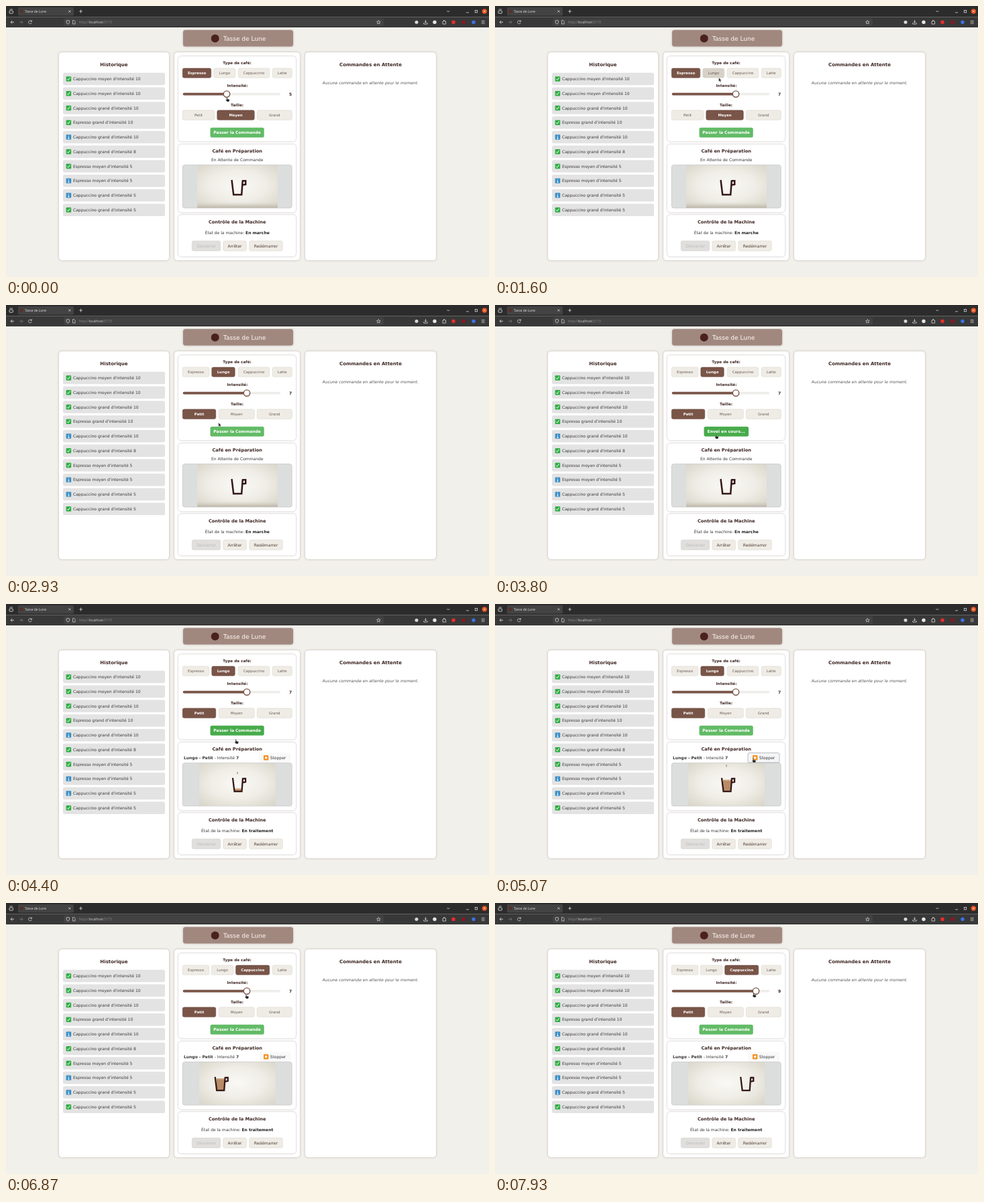
Animation of 720x405 px, one loop 8000 ms. Source, as an HTML page:

```html
<!DOCTYPE html>
<html lang="fr">
<head>
<meta charset="utf-8">
<title>Tasse de Lune</title>
<style>
html, body { margin: 0; width: 100%; height: 100%; overflow: hidden; background: #f2f0eb; }
svg { display: block; width: 720px; height: 405px; font-family: "DejaVu Sans", sans-serif; }
.ui { font-family: "Open Sans", "Noto Sans", sans-serif; }
.card { filter: drop-shadow(0 .8px 1.6px rgba(60, 45, 35, .32)); }
</style>
</head>
<body>
<svg viewBox="0 0 720 405">
  <defs>
    <radialGradient id="paper" cx=".5" cy=".48" r=".72">
      <stop offset="0" stop-color="#faf9f6"/>
      <stop offset=".5" stop-color="#efede6"/>
      <stop offset="1" stop-color="#d8d4c8"/>
    </radialGradient>
    <linearGradient id="floor" x2="0" y2="1">
      <stop offset="0" stop-color="#d5d1c5" stop-opacity="0"/>
      <stop offset="1" stop-color="#b9b3a5"/>
    </linearGradient>
    <clipPath id="view"><rect x="288" y="238" width="114" height="63.6"/></clipPath>
  </defs>
  <g id="fixed"></g>
  <g id="live"></g>
</svg>
<script>
const LOOP = 8000;
const BROWN = '#795548', DARK = '#3e2723', INK = '#383838', CUP = '#351917';

// Shapes: boxes are given by their edges, text by its vertical middle.
const box = (l, t, r, b, fill, radius = 0, extra = '') =>
  `<rect x="${l}" y="${t}" width="${r - l}" height="${b - t}" rx="${radius}" fill="${fill}" ${extra}/>`;
const dot = (x, y, r, fill, extra = '') => `<circle cx="${x}" cy="${y}" r="${r}" fill="${fill}" ${extra}/>`;
const line = (d, color, width = 1, extra = '') =>
  `<path d="${d}" fill="none" stroke="${color}" stroke-width="${width}" ${extra}/>`;
const text = (x, y, size, content, fill = INK, extra = '') =>
  `<text x="${x}" y="${y + size * .365}" font-size="${size}" fill="${fill}" ${extra}>${content}</text>`;
const MID = 'text-anchor="middle"', BOLD = 'font-weight="700"';
const mid = (x, y, size, content, fill, extra = '') => text(x, y, size, content, fill, `${MID} ${extra}`);
const heading = (x, y, size, content) => mid(x, y, size, content, DARK, BOLD);
const card = (l, t, r, b) => box(l, t, r, b, '#fff', 4.5, 'class="card"');

function button(l, t, r, b, label, size, mode = '') {
  const on = mode === 'on', off = mode === 'off';
  const fill = on ? BROWN : off ? '#e0dfdd' : mode === 'hover' ? '#d7d1c8' : '#efece6';
  const edge = on ? '#654438' : off ? '#cfcecb' : '#d6d0c6';
  const color = on ? '#fff' : off ? '#bdbbb8' : size > 5.5 ? '#4e3a33' : '#6b5950';
  return box(l + .25, t + .25, r - .25, b - .25, fill, 2.4, `stroke="${edge}" stroke-width=".5"`) +
    mid((l + r) / 2, (t + b) / 2, size, label, color, on ? BOLD : '');
}

function browser() {
  const c = '#d8d8d8', dim = '#8b8b8b';
  return box(0, 0, 720, 16.5, '#2c2c2c') + box(0, 16.5, 720, 32, '#383838') +
    box(18, 2, 101, 14.5, '#434343', 2) + box(86, 18.2, 563, 30, '#424242', 2) +
    box(5, 7, 10.4, 11, 'none', 1, `stroke="${c}" stroke-width=".9"`) + line('M5.5 5H10', c, .8) +
    dot(23, 8, 2.6, '#5a3029') + text(28, 8, 4.9, 'Tasse de Lune', '#e0e0e0', 'class="ui"') +
    line('M93.3 6.5l3 3m0-3l-3 3M109 8h5m-2.5-2.5v5M657.3 7l2 2 2-2M686 9.8h4', c, .8) +
    box(699.3, 6.5, 702.7, 9.8, 'none', 0, `stroke="${c}" stroke-width=".8"`) +
    dot(713.3, 8, 3.7, '#e95420') + line('M712 6.7l2.6 2.6m0-2.6l-2.6 2.6', '#fff', .7) +
    line('M12 24.2H7m2.2-2.3L7 24.2l2.2 2.3', c, .9) +
    line('M20 24.2h5m-2.2-2.3l2.2 2.3-2.2 2.3', '#777', .9) +
    line('M38 23a2.4 2.4 0 1 0 .2 2M38.4 21.2V23.2h-2', c, .8) +
    line('M92.3 21.3l2.2.8v2q-.2 2-2.2 3-2-1-2.2-3v-2z', c, .8) +
    line('M99.5 21.5h2.2l1.4 1.4v4h-3.6z', c, .7) +
    text(109, 24.2, 5.05, 'http://<tspan fill="#d5d5d5">localhost</tspan>:5173', dim, 'class="ui"') +
    line('M555.4 21.4l.8 1.9 2 .2-1.5 1.3.5 2-1.8-1-1.8 1 .5-2-1.5-1.3 2-.2z', c, .7) +
    dot(612, 24.2, 2.5, c) + line('M625.5 21v4m-1.8-1.6l1.8 1.7 1.8-1.7M622.8 25v2h5.4v-2', c, .8) +
    dot(639, 24.2, 2.7, '#e6e6e6') + line('M651 23h1.5v-1.5h1.6V23h1.5v4H651z', c, .8) +
    box(664.5, 21.8, 669.5, 26.8, '#ef2b2b', .8) + dot(682, 24.2, 2.7, '#8d1720') +
    dot(697, 24.2, 2.7, '#3b72e8') + line('M708.7 22.2h5m-5 2h5m-5 2h5', c, .7);
}

const HISTORY = [
  ['Cappuccino moyen', 10, 1], ['Cappuccino moyen', 10, 1], ['Cappuccino grand', 10, 1],
  ['Espresso grand', 10, 1], ['Cappuccino grand', 10, 0], ['Cappuccino grand', 8, 1],
  ['Espresso moyen', 5, 1], ['Espresso moyen', 5, 0], ['Cappuccino grand', 5, 0],
  ['Cappuccino grand', 5, 1]];

function historyRow([drink, strength, done], i) {
  const y = 109 + i * 21.75;
  const mark = done
    ? line(`M91.2 ${y + .2}l1.5 1.7 2.8-4`, '#fff', 1)
    : line(`M93.4 ${y - 2.4}v1.1m-.8 1h.8v2.7m-1.2 0h2.4`, '#fff', .9);
  return box(85, y - 9.2, 237, y + 9.2, '#e3e3e3', 2.5) +
    box(89.6, y - 3.7, 97.2, y + 3.7, done ? '#2fae43' : '#3a8fc7', 1) + mark +
    text(100, y, 6, `${drink} d'intensité ${strength}`);
}

document.getElementById('fixed').innerHTML =
  box(0, 0, 720, 405, '#f2f0eb') + browser() +
  box(264, 36, 428, 60.5, '#a1887f', 3.5, 'class="card"') +
  dot(311.7, 48.4, 6, '#4a211e') + text(324, 48.3, 9, 'Tasse de Lune', '#fff8f2') +
  card(79, 69.3, 243, 380) + card(251, 69.3, 438, 380) + card(446, 69.3, 641, 380) +
  card(257, 75.3, 432, 202) + card(257, 207, 432, 308) + card(257, 312.3, 432, 374.3) +
  heading(161, 87, 7.02, 'Historique') + HISTORY.map(historyRow).join('') +
  heading(543.5, 87, 7.02, 'Commandes en Attente') +
  heading(344.6, 85.2, 5.7, 'Type de café:') + heading(345, 119.2, 5.7, 'Intensité:') +
  heading(344.6, 148.2, 5.7, 'Taille:') +
  heading(344.7, 217, 6.6, 'Café en Préparation') +
  heading(344.7, 322.8, 6.6, 'Contrôle de la Machine') +
  button(277, 350.8, 320, 366.3, 'Démarrer', 6, 'off') +
  button(323.6, 350.8, 358.6, 366.3, 'Arrêter', 6) +
  button(362.5, 350.8, 412.5, 366.3, 'Redémarrer', 6);

// Pointer stops: time, x, y.
const PATH = [
  [0, 328.4, 136], [120, 328.4, 136], [650, 358, 137], [870, 362, 150], [1050, 362, 150],
  [1600, 333.5, 107], [1780, 326, 101], [2000, 326, 101], [2400, 306.3, 160], [2680, 306.3, 160],
  [3200, 328.4, 193], [4200, 328.4, 193], [4830, 384, 230], [5150, 384, 230],
  [5700, 384, 193], [6350, 369, 101], [6600, 369, 101], [6850, 357, 136], [7150, 357, 136],
  [7650, 384, 135], [8000, 384.6, 134]];

function pointerAt(t) {
  const i = Math.max(1, PATH.findIndex(stop => stop[0] > t));
  const [t0, x0, y0] = PATH[i - 1], [t1, x1, y1] = PATH[i];
  const k = (t - t0) / (t1 - t0), e = k * k * (3 - 2 * k);
  return [x0 + (x1 - x0) * e, y0 + (y1 - y0) * e];
}

// Last value whose start time has passed.
const stepAt = (t, steps) => steps.filter(s => s[0] <= t).pop()[1];
const LEVEL = [[0, 5], [350, 6], [600, 7], [7350, 8], [7620, 9]];
const DRINK = [[0, 0], [1870, 1], [6480, 2]];
const DRINKS = ['Espresso', 'Lungo', 'Cappuccino', 'Latte'];
const DRINK_EDGES = [
  [[263, 306], [309.5, 342], [346, 393], [397, 426.5]],
  [[263, 303], [306.5, 341.5], [346, 393], [397, 426.5]],
  [[263, 303], [306, 339], [342.3, 393], [397, 426.5]]];
const SIZES = ['Petit', 'Moyen', 'Grand'];
const SIZE_EDGES = [
  [[263, 313], [317, 370.5], [374, 426.5]],
  [[263, 311], [314.5, 370.5], [374, 426.5]]];

function choices(labels, edges, chosen, top, bottom, [px, py]) {
  return labels.map((label, i) => {
    const [l, r] = edges[i];
    const over = px > l && px < r && py > top && py < bottom;
    return button(l, top, r, bottom, label, 5.4, i === chosen ? 'on' : over ? 'hover' : '');
  }).join('');
}

// Cup around its own centre; fill runs from 0 (empty) to 1.
function cup(x, y, scale, fill) {
  const top = 10.5 - 19 * fill;
  const coffee = fill > 0 ? box(-6.5, top, 6.5, 10.5, '#b98b66') + box(-6.5, top, 6.5, top + 1.4, '#d2ae8b') : '';
  return `<g transform="translate(${x} ${y}) scale(${scale})">${coffee}` +
    line('M-8.7-11L-6 11H6L7.6-10.5M7-9.8H12V-4.2L7.2-3.4', CUP, 2.5) + '</g>';
}

function preparation(t) {
  const frame = box(263.2, 237.5, 426.3, 302, '#dcdddd', 3.5, 'stroke="#bfc0c0" stroke-width=".6"');
  if (t < 4150) {
    return mid(344.7, 229.7, 6, 'En Attente de Commande') + frame +
      box(285, 238, 405, 301.6, 'url(#paper)') + box(285, 293, 405, 301.6, 'url(#floor)') +
      cup(345.2, 271, 1, 0);
  }
  const fill = Math.min(1, (t - 4200) / 900);
  const shift = Math.max(0, t - 6520) * .075;
  let scene = cup(346 - shift, 270, .92, Math.max(0, fill)) + cup(480 - shift, 270, .92, 0);
  if (t < 5900) {
    const y = 240 + ((t - 4150) % 460) / 460 * 20;
    scene += line(`M345 ${y}v3.4`, '#8d6a50', .9);
  }
  const over = t > 4780 && t < 5330;
  const stop = box(377, 222.5, 424, 237, over ? '#f4f5f6' : '#f9f9fa', 2.2,
      over ? 'stroke="#8f9499" stroke-width=".6"' : '') +
    box(384, 226, 391.4, 233.4, '#f7901e', 1) + box(386.2, 228.2, 389.2, 231.2, '#fff') +
    text(393.7, 229.7, 6, 'Stopper');
  return text(265, 229.7, 6, `<tspan ${BOLD}>Lungo - Petit</tspan> - Intensité <tspan ${BOLD}>7</tspan>`) +
    frame + box(288, 238, 402, 301.6, 'url(#paper)') + `<g clip-path="url(#view)">${scene}</g>` + stop;
}

function orderButton(t) {
  if (t >= 3660 && t < 4070) {
    return box(311.5, 181.8, 378, 196.5, '#47ab4b', 2.5) +
      mid(344.7, 189.2, 6, 'Envoi en cours...', '#fff', BOLD);
  }
  const over = t > 3080 && t < 4450 || t > 5710 && t < 5800;
  return box(304.5, 181.8, 384.7, 196.5, over ? '#47ab4b' : '#62bb66', 2.5) +
    mid(344.6, 189.2, 6, 'Passer la Commande', '#fff', BOLD);
}

function pointer(t, [x, y]) {
  const arrow = t > 800 && t < 1660 || t > 2060 && t < 2340 || t > 2780 && t < 3080 ||
    t > 4450 && t < 4780 || t > 5330 && t < 6280 || t > 6660 && t < 6780;
  const d = arrow
    ? 'M0 0V6L1.4 4.8 2.4 7 3.4 6.6 2.4 4.5H4.2Z'
    : 'M.3.4Q1-.3 1.6.5V2.9L4.5 3.5Q5 3.8 4.8 4.6L4.2 7H1.1L-.9 4.5Q-.8 3.6 .3 4.2Z';
  return `<path transform="translate(${x} ${y})" d="${d}" fill="#252525" stroke="#f7f7f7" stroke-width=".35"/>`;
}

const live = document.getElementById('live');

function draw(t) {
  const at = pointerAt(t), level = stepAt(t, LEVEL), drink = stepAt(t, DRINK);
  const size = t < 2580 ? 1 : 0, thumb = 269 + 15 * (level - 1);
  const waiting = t < 4070 || t > 4270;
  live.innerHTML =
    choices(DRINKS, DRINK_EDGES[drink], drink, 92.8, 107.6, at) +
    box(263.7, 129.8, 409, 133.5, '#efedeb', 1.8) + box(263.7, 129.8, thumb, 133.5, BROWN, 1.8) +
    dot(thumb, 131.6, 4.7, '#fff', `stroke="${BROWN}" stroke-width="1.4"`) +
    mid(424, 131.6, 6, level, DARK, BOLD) +
    choices(SIZES, SIZE_EDGES[size], size, 155.6, 170.6, at) +
    orderButton(t) + preparation(t) +
    mid(344.7, 338.5, 6, `État de la machine: <tspan ${BOLD} fill="#222">${t < 4150 ? 'En marche' : 'En traitement'}</tspan>`) +
    (waiting ? mid(543.4, 114.5, 6, 'Aucune commande en attente pour le moment.', '#555', 'font-style="italic"') : '') +
    pointer(t, at);
}

const start = performance.now();
function tick() {
  draw((performance.now() - start) % LOOP);
  requestAnimationFrame(tick);
}
tick();
</script>
</body>
</html>
```
